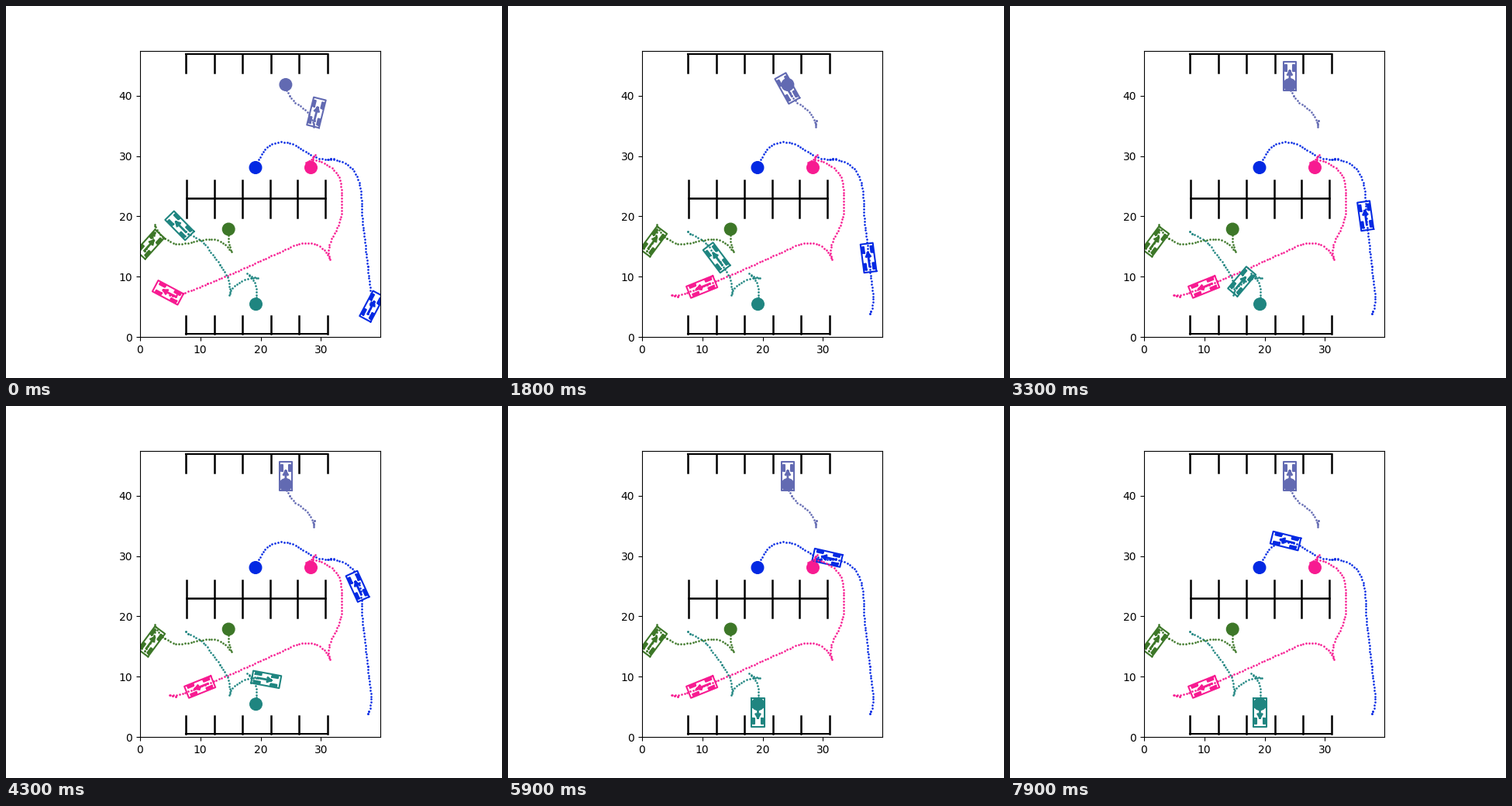
Animation of 640x480 px, one loop 8 s. Source, as a matplotlib script:

```python
import numpy as np
import matplotlib.pyplot as plt
from matplotlib.animation import FuncAnimation

WIDTH, HEIGHT = 39.85, 47.45
SCALE = 369.6 / HEIGHT                           # pixels per metre
LEFT, BOTTOM = 328 - WIDTH * SCALE / 2, 427.2    # lower left corner in pixels
FRAMES, INTERVAL = 80, 100
HOLDS = (1, 3, 19)               # ticks on which all cars wait
STEP = 0.5                       # metres driven per tick

# Vehicle geometry in metres, measured from the rear axle
WHEELBASE, FRONT, REAR, BODY = 2.8, 3.78, 0.94, 2.06
TYRE_RADIUS, TYRE_HALF, TRACK = 0.5, 0.125, 1.36
ARROW = 0.8 * WHEELBASE

# Each car: colour, step at which it stops, key poses (px, py, heading)
CARS = [
    ("#0329e3", None, [
        (466.8, 397.3, 62), (470.4, 368, 97.5), (460.4, 283, 97.5),
        (446.8, 210.4, 130), (415, 197.5, 178), (423, 197, 178),
        (412, 197.8, 180), (384, 186.5, 146), (365.4, 176.5, 167),
        (343.5, 178, 205), (322, 208.5, 250)]),
    ("#f71b91", 16, [
        (218.7, 375, 152), (210, 372.2, 163), (231, 370, 201),
        (366, 311.5, 205), (401.5, 308.5, 155), (418.5, 327.5, 112),
        (418, 306, 68), (433, 265, 88), (431, 225, 103), (401, 199, 165),
        (386, 202, 195), (399, 191, 240), (393.5, 208.5, 270)]),
    ("#1f8580", None, [
        (231.7, 291.3, 134.5), (246, 299, 145), (259.3, 310.8, 127),
        (278.2, 336.7, 127), (288, 374, 78), (293.2, 362.6, 45),
        (326, 351, -8), (311, 345, -42), (322.9, 363.3, -77.5),
        (322.5, 384.7, -90)]),
    ("#626ab2", None, [
        (397.8, 148.2, 76), (397, 157, 92), (389.9, 138.3, 131),
        (365.6, 115.6, 119), (360.9, 101.5, 90)]),
    ("#3d7728", 1, [
        (178.6, 315.7, 48), (192, 281, 100), (225, 307, 182),
        (265, 300.5, 180), (291.5, 317.5, 125), (287.2, 288, 90)]),
]


def to_metres(px, py):
    return (px - LEFT) / SCALE, (BOTTOM - py) / SCALE


def drive(start, end):
    """Hermite curve between two poses; the gear follows from the chord."""
    u = np.linspace(0, 1, 60)[:, None]
    chord = end[:2] - start[:2]
    face_a, face_b = (np.array([np.cos(p[2]), np.sin(p[2])]) for p in (start, end))
    reach = np.sign(chord @ (face_a + face_b)) * np.hypot(*chord)
    points = (start[:2] + u * u * (3 - 2 * u) * chord
              + reach * u * (1 - u) * ((1 - u) * face_a - u * face_b))
    return np.hstack([points, start[2] + u * (end[2] - start[2])])


def build_path(keys):
    """Drive through all key poses at constant speed, one (x, y, yaw) per step."""
    poses = [np.array([*to_metres(px, py), np.radians(h)]) for px, py, h in keys]
    track = np.vstack([drive(a, b) for a, b in zip(poses, poses[1:])])
    gaps = np.hypot(*np.diff(track[:, :2], axis=0).T)
    travelled = np.concatenate([[0], np.cumsum(gaps)])
    stations = np.append(np.arange(0, travelled[-1], STEP), travelled[-1])
    return np.column_stack([np.interp(stations, travelled, col) for col in track.T])


def rectangle(x0, x1, y0, y1):
    return [(x0, y0), (x1, y0), (x1, y1), (x0, y1), (x0, y0), (np.nan, np.nan)]


def car_outline():
    parts = rectangle(-REAR, FRONT, -BODY / 2, BODY / 2)
    for x in (0, WHEELBASE):
        for y in (-TRACK / 2, TRACK / 2):
            parts += rectangle(x - TYRE_RADIUS, x + TYRE_RADIUS,
                               y - TYRE_HALF, y + TYRE_HALF)
    return np.array(parts)


def arrow_outline():
    barb = 0.3 * ARROW
    back, side = ARROW - barb * np.cos(np.pi / 6), barb * np.sin(np.pi / 6)
    gap, tip = (np.nan, np.nan), (ARROW, 0)
    return np.array([(0, 0), tip, gap, tip, (back, side), gap, tip, (back, -side)])


def place(shape, pose):
    x, y, yaw = pose
    c, s = np.cos(yaw), np.sin(yaw)
    return x + shape[:, 0] * c - shape[:, 1] * s, y + shape[:, 0] * s + shape[:, 1] * c


def step_at(frame):
    return frame - sum(frame >= hold for hold in HOLDS)


def draw_bays(x0, x1, y0, y1, wall, wall_width):
    """Six bay dividers joined by one wall, in pixels."""
    for x in np.linspace(x0, x1, 6):
        ax.plot(*to_metres(np.array([x, x]), np.array([y0, y1])), "k", lw=1.8)
    ax.plot(*to_metres(np.array([x0, x1]), np.array([wall, wall])), "k", lw=wall_width)


fig, ax = plt.subplots(figsize=(6.4, 4.8), dpi=100)
ax.set_aspect("equal")
ax.set_xlim(0, WIDTH)
ax.set_ylim(0, HEIGHT)
ax.set_xticks(range(0, 40, 10))
ax.set_yticks(range(0, 50, 10))

draw_bays(232.4, 414.6, 62.2, 86, 62.2, 1.5)
draw_bays(233.4, 412.2, 225, 272.5, 248, 1.8)
draw_bays(232.4, 414.6, 399.5, 423, 423, 1.5)

BODY_SHAPE, ARROW_SHAPE = car_outline(), arrow_outline()
waits = [step_at(hold) for hold in HOLDS]
cars = []
for color, stop, keys in CARS:
    path = build_path(keys)
    ax.add_patch(plt.Circle(path[-1, :2], 1, color=color))
    # Points where the car waits are marked twice and look denser
    for dots in (path, path[waits]):
        ax.plot(dots[:, 0], dots[:, 1], "o", ms=1.9, mew=0, color=color)
    body, = ax.plot([], [], color=color, lw=1.5)
    arrow, = ax.plot([], [], color=color, lw=2)
    last = len(path) - 1 if stop is None else stop
    cars.append((path, last, body, arrow))


def update(frame):
    artists = []
    for path, last, body, arrow in cars:
        pose = path[min(step_at(frame), last)]
        body.set_data(*place(BODY_SHAPE, pose))
        arrow.set_data(*place(ARROW_SHAPE, pose))
        artists += [body, arrow]
    return artists


animation = FuncAnimation(fig, update, frames=FRAMES, interval=INTERVAL,
                          repeat=True, repeat_delay=0)
plt.show()
```
